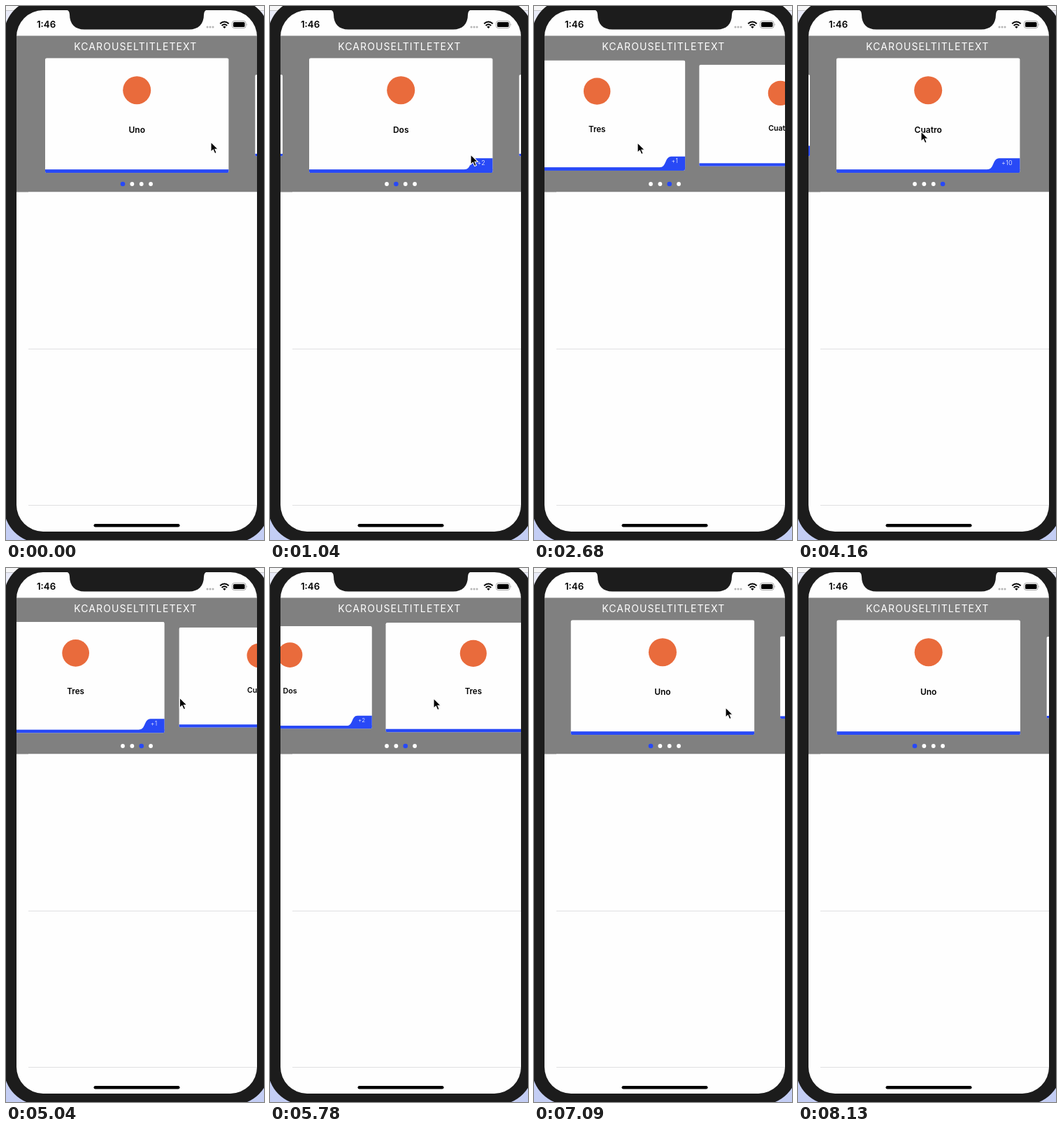
Write an HTML page that moves like this. It is 369 px wide and 762 px high and loops after 8420 ms.

```html
<!DOCTYPE html>
<html lang="en">
<head>
<meta charset="utf-8">
<title>Carousel on a phone</title>
<style>
  html, body { margin: 0; width: 100%; height: 100%; overflow: hidden; }
  svg { display: block; }
  text { font-family: Inter, Roboto, sans-serif; }
  .heading { font-size: 14px; letter-spacing: 1.1px; fill: #fff; }
  .clock { font-size: 13.3px; font-weight: 600; }
  .name { font-size: 12px; font-weight: 600; text-anchor: middle; }
  .badge { font-size: 9px; font-weight: 300; letter-spacing: .3px; fill: #fff; text-anchor: end; }
</style>
</head>
<body>
<svg width="369" height="762" viewBox="0 0 369 762">
  <defs>
    <linearGradient id="desk" x2="0" y2="1">
      <stop stop-color="#e9ebf8"/><stop offset="1" stop-color="#c3cdf4"/>
    </linearGradient>
    <clipPath id="screen"><rect x="15" y="6" width="344" height="744" rx="38"/></clipPath>
    <clipPath id="card"><rect x="-131.2" y="-82" width="262.4" height="164" rx="2.5"/></clipPath>
  </defs>
  <rect width="369" height="762" fill="url(#desk)"/>
  <path d="M0 0H369V6H0" fill="#f6f6f7"/>
  <path d="M0 6.5H369" stroke="#c4c4c8"/>
  <rect x="-3" y="-10" width="380" height="776" rx="52" fill="#1c1c1c"/>

  <g clip-path="url(#screen)">
    <rect x="15" y="6" width="344" height="744" fill="#fefefe"/>
    <rect x="15" y="42.5" width="344" height="223" fill="#808080"/>
    <path d="M32 265.5H359M32 489.5H359M32 712.5H359" stroke="#e0e0e1"/>
    <text class="heading" x="97.2" y="62.8">KCAROUSELTITLETEXT</text>
    <g id="cards"></g>
    <g id="dots"></g>
    <rect x="125.5" y="739" width="123" height="4.5" rx="2.25"/>
  </g>

  <path d="M85 5Q91 6 91 12C91 26 99 33.5 112 33.5H262C275 33.5 283 26 283 12Q283 6 289 5Z" fill="#1c1c1c"/>
  <text class="clock" x="44" y="31.3">1:46</text>
  <path d="M288 30H300" stroke="#b5b5b5" stroke-width="3" stroke-linecap="round" stroke-dasharray="0 4"/>
  <g fill="none" stroke="#000" stroke-width="2">
    <path d="M306.2 25.2Q312.4 19.8 318.6 25.2M308.6 27.9Q312.4 24.6 316.2 27.9"/>
  </g>
  <path d="M310.2 29.7Q312.4 28 314.6 29.7L312.4 32Z"/>
  <rect x="323.5" y="21.5" width="19.5" height="10" rx="2.8" fill="none" stroke="#a5a5a5"/>
  <rect x="325" y="23" width="16.5" height="7" rx="1.5"/>
  <path d="M344.2 25Q346 26.5 344.2 28Z" fill="#a5a5a5"/>

  <path id="cursor" d="M0 0V14.2L3.3 11.2L5.7 16.6L8.2 15.5L5.9 10.3H10.4Z" stroke="#fff" stroke-width="1.1"/>
</svg>
<script>
const LOOP = 8420, TICK = 147.7, PITCH = 262.3, BLUE = '#2849f6';

// name, badge text, badge width
const items = [['Uno'], ['Dos', '+2', 40], ['Tres', '+1', 37.5], ['Cuatro', '+10', 46.5]];

// tick, page position, 1 = released and gliding
const scrollKeys = [
  [0, 0], [2.5, .42], [7, 1, 1], [9.5, 1], [12, 1.47], [16, 2, 1], [18, 2.37], [27, 3.004, 1],
  [28, 3.004], [30, 3], [31, 3], [33.5, 2.53], [37, 2, 1], [39, 1.605], [41.5, 1, 1], [43, .45], [50, .002, 1]
];
// tick, x, y
const cursorKeys = [
  [0, 293, 194], [2.5, 183, 197], [7, 287, 212], [9.5, 287, 212], [12, 164, 205], [16, 245, 198],
  [18, 148, 195], [19.5, 122, 191], [28, 176, 179], [31, 145, 183], [33.5, 268, 185], [37, 131, 186],
  [39, 234, 186], [41.5, 125, 188], [43, 250, 190], [44, 253, 190], [48, 274, 199], [51, 274, 199], [55, 382, 765]
];

const byId = id => document.getElementById(id);

function badge(label, width) {
  const x = 131.2 - width;
  return `<path d="M${x} 78V77C${x + 10} 77 ${x + 7} 61 ${x + 17} 61H132V78Z" fill="${BLUE}"/>
    <text class="badge" x="120.8" y="71">${label}</text>`;
}

byId('cards').innerHTML = items.map(([name, label, width]) => `<g><g clip-path="url(#card)">
  <rect x="-132" y="-82" width="264" height="164" fill="#fefefe"/>
  <rect x="-132" y="77" width="264" height="5" fill="${BLUE}"/>
  <circle cy="-36" r="20" fill="#e96b3c"/>
  <text class="name" y="25">${name}</text>${label ? badge(label, width) : ''}</g></g>`).join('');
byId('dots').innerHTML = items.map((_, i) => `<circle cx="${167 + i * 13.35}" cy="254"/>`).join('');

const cards = [...byId('cards').children];
const dots = [...byId('dots').children];

function sample(keys, tick, column) {
  const next = keys.findIndex(key => key[0] > tick);
  if (next < 0) return keys[keys.length - 1][column];
  const a = keys[next - 1], b = keys[next];
  let u = (tick - a[0]) / (b[0] - a[0]);
  if (keys === scrollKeys && b[2]) u = 1 - (1 - u) ** 3;
  return a[column] + (b[column] - a[column]) * u;
}

function draw(time) {
  const tick = Math.floor(time % LOOP / TICK);
  const page = sample(scrollKeys, tick, 1);
  cards.forEach((card, i) => {
    const distance = i - page;
    const scale = 1 - .29 * Math.min(1, distance * distance);
    card.setAttribute('transform', `translate(${187.2 + distance * PITCH} 156.2) scale(${scale})`);
  });
  dots.forEach((dot, i) => {
    const active = i === Math.round(page);
    dot.setAttribute('r', active ? 3.3 : 2.9);
    dot.setAttribute('fill', active ? BLUE : '#fff');
  });
  byId('cursor').setAttribute('transform',
    `translate(${sample(cursorKeys, tick, 1)} ${sample(cursorKeys, tick, 2)})`);
}

const start = performance.now();
function frame() {
  draw(performance.now() - start);
  requestAnimationFrame(frame);
}
frame();
</script>
</body>
</html>
```
